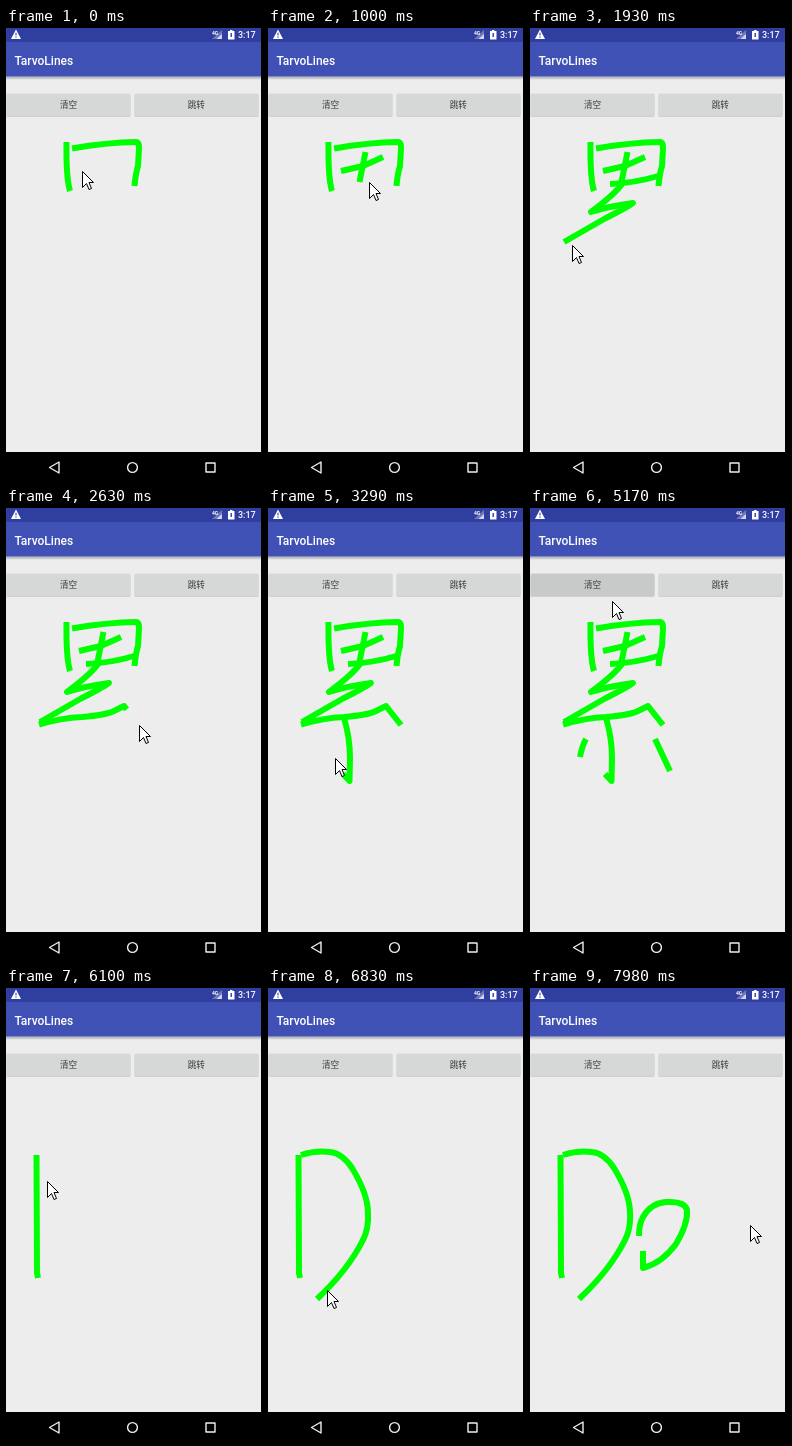
Recreate the animation shown at these times as an HTML page. Size 256 by 452 pixels, loop 8000 ms.

```html
<!DOCTYPE html>
<html lang="zh">
<head>
<meta charset="utf-8">
<title>Finger drawing</title>
<style>
  html, body { margin: 0; width: 100%; height: 100%; overflow: hidden; background: #000; }
  svg { display: block; width: 100vw; height: 100vh; }
  text { font-family: Roboto, "Noto Sans CJK SC", "Noto Sans CJK", sans-serif; }
  .label { font-size: 8.6px; fill: #3a3a3a; text-anchor: middle; }
  .button { fill: #d6d7d7; }
  .button.pressed { fill: #c8c9c9; }
  .ink path { fill: none; stroke: #0f0; stroke-width: 6; stroke-linejoin: round; }
  .nav { fill: none; stroke: #f0f0f0; stroke-width: 1.4; stroke-linejoin: round; }
</style>
</head>
<body>
<svg viewBox="0 0 256 452" preserveAspectRatio="none">
  <defs>
    <linearGradient id="shade" x2="0" y2="1">
      <stop offset="0" stop-color="#000" stop-opacity=".3"/>
      <stop offset="1" stop-color="#000" stop-opacity="0"/>
    </linearGradient>
  </defs>
  <rect width="256" height="452" fill="#000"/>
  <rect width="255" height="424" fill="#ededed"/>
  <rect y="48.5" width="255" height="3.5" fill="url(#shade)"/>
  <rect y="14" width="255" height="34.5" fill="#3f51b5"/>
  <rect width="255" height="14" fill="#303f9f"/>

  <path d="M10 1.5L15 11H5Z" fill="#fff"/>
  <path d="M10 4.8V7.6M10 8.6V9.8" stroke="#303f9f" stroke-width="1.1"/>
  <path d="M206 11L216 2V11Z" fill="#fff" opacity=".3"/>
  <path d="M210.5 11L216 6V11Z" fill="#fff" opacity=".7"/>
  <text x="206" y="6.5" font-size="5" font-weight="700" fill="#fff">4G</text>
  <path d="M222 3h2v-1h2.5v1h2v8.5h-6.5z" fill="#fff"/>
  <path d="M225.2 5v4" stroke="#303f9f" stroke-width="1.4"/>
  <text x="232" y="10" font-size="9" font-weight="500" fill="#fff">3:17</text>
  <text x="8.5" y="36.5" font-size="12" font-weight="500" fill="#fff">TarvoLines</text>

  <g fill="#000" opacity=".12">
    <rect x="0.5" y="66.5" width="124" height="22.5" rx="1.5"/>
    <rect x="128.5" y="66.5" width="124" height="22.5" rx="1.5"/>
  </g>
  <rect id="clear" class="button" x="0.5" y="65.5" width="124" height="22.5" rx="1.5"/>
  <rect class="button" x="128.5" y="65.5" width="124" height="22.5" rx="1.5"/>
  <text class="label" x="62.5" y="79.7">清空</text>
  <text class="label" x="190.3" y="79.7">跳转</text>

  <g id="ink" class="ink"></g>

  <g class="nav">
    <path d="M53 434V445L43.5 439.5Z"/>
    <circle cx="126.5" cy="439.5" r="4.9"/>
    <rect x="200" y="435" width="9" height="9"/>
  </g>

  <path id="cursor" d="M.5 .5V16.5L4.5 12.5L7 18.5L9.5 17.5L7 11.5H11.5Z" fill="#fff" stroke="#000"/>
</svg>

<script>
const LOOP = 8000, LAG = 130, PRESS = 5030, CLEAR = 5300;
const NS = "http://www.w3.org/2000/svg";
const byId = id => document.getElementById(id);

// Screen refreshes: [first, last, count]
const bursts = [
  [0, 0, 1], [150, 1120, 8], [1260, 1930, 5], [2080, 2210, 2], [2360, 3290, 8],
  [3440, 4380, 8], [4500, 5440, 8], [5590, 6100, 5], [6250, 6530, 3],
  [6680, 6830, 2], [6950, 7710, 6], [7830, 7980, 2]
];
const ticks = bursts.flatMap(([a, b, n]) =>
  Array.from({ length: n }, (_, i) => Math.floor((a + (n > 1 ? (b - a) * i / (n - 1) : 0)) / 10) * 10));

// Pen strokes: [start, end, path]
const strokes = [
  [-900, -600, "M60.5 114Q60 150 64 163"],
  [-500, -150, "M66 120.500Q100 114.500 130 114Q133.500 114 133 121L132 138Q129.500 146 128.500 158"],
  [90, 400, "M73 143L95 138L115 129"],
  [520, 720, "M97.5 124L91.5 154"],
  [850, 1160, "M80 156Q105 155 130 147.5"],
  [1290, 1800, "M92 156Q85 166 61 184Q80 178 103 175Q96 180 75 190.5L34 214"],
  [1890, 2620, "M33 216.5Q55 210 76 209Q100 207 108 203L118 198L133 217"],
  [2800, 3150, "M76 210Q82 230 82 250L81.5 273L75 266"],
  [3440, 3620, "M56 231Q52 238 50 249"],
  [3900, 4200, "M125 231L140 263"],
  [5490, 5850, "M30.5 167L31 285L32 290"],
  [6300, 6700, "M33 167Q48 162 62 164Q74 165 84 180Q100 206 100 225Q101 240 95 252Q80 282 49 311"],
  [7060, 7600, "M109 248Q109 236 113 229Q121 215 136 214Q155 213 157 222Q158 236 146 256Q132 275 113 280L113 263"]
].map(([from, to, d]) => {
  const path = document.createElementNS(NS, "path");
  path.setAttribute("d", d);
  byId("ink").append(path);
  return { from, to, path, length: path.getTotalLength() };
});

const clamp = v => Math.max(0, Math.min(1, v));
const along = (s, t) => s.length * clamp((t - s.from) / (s.to - s.from));

// Pointer stops between strokes: [time, x, y]
const stops = [
  [0, 76, 143], [1930, 42, 217], [3290, 67, 250], [4380, 120, 305], [4500, 116, 309],
  [5000, 85, 77], [5060, 84, 78], [5170, 82, 93], [5440, 29, 165], [6100, 41, 193],
  [6830, 59, 302], [7710, 134, 248], [7980, 220, 237], [LOOP, 220, 237]
];
const keys = stops.map(([time, x, y]) => ({ time, x, y }));
for (const s of strokes) {
  for (const time of [s.from, s.to]) {
    const p = s.path.getPointAtLength(along(s, time));
    keys.push({ time, x: p.x, y: p.y });
  }
}
keys.sort((a, b) => a.time - b.time);

function pointer(t) {
  const stop = stops.find(k => k[0] === t);
  if (stop) return { x: stop[1], y: stop[2] };
  const s = strokes.find(k => t >= k.from && t <= k.to);
  if (s) return s.path.getPointAtLength(along(s, t));
  const i = keys.findIndex(k => k.time > t);
  const a = keys[i - 1], b = keys[i];
  const f = (t - a.time) / (b.time - a.time);
  return { x: a.x + (b.x - a.x) * f, y: a.y + (b.y - a.y) * f };
}

function draw(t) {
  for (const s of strokes) {
    const done = along(s, t - LAG);
    const wiped = s.from < CLEAR && t >= CLEAR;
    s.path.style.display = done > 0 && !wiped ? "" : "none";
    s.path.style.strokeDasharray = done < s.length ? `${done} ${s.length + 9}` : "none";
  }
  const p = pointer(t);
  byId("cursor").setAttribute("transform", `translate(${Math.round(p.x)} ${Math.round(p.y)})`);
  byId("clear").classList.toggle("pressed", t >= PRESS && t < CLEAR);
}

function frame() {
  const now = performance.now() % LOOP;
  draw(ticks.filter(k => k <= now).pop());
  requestAnimationFrame(frame);
}
frame();
</script>
</body>
</html>
```
